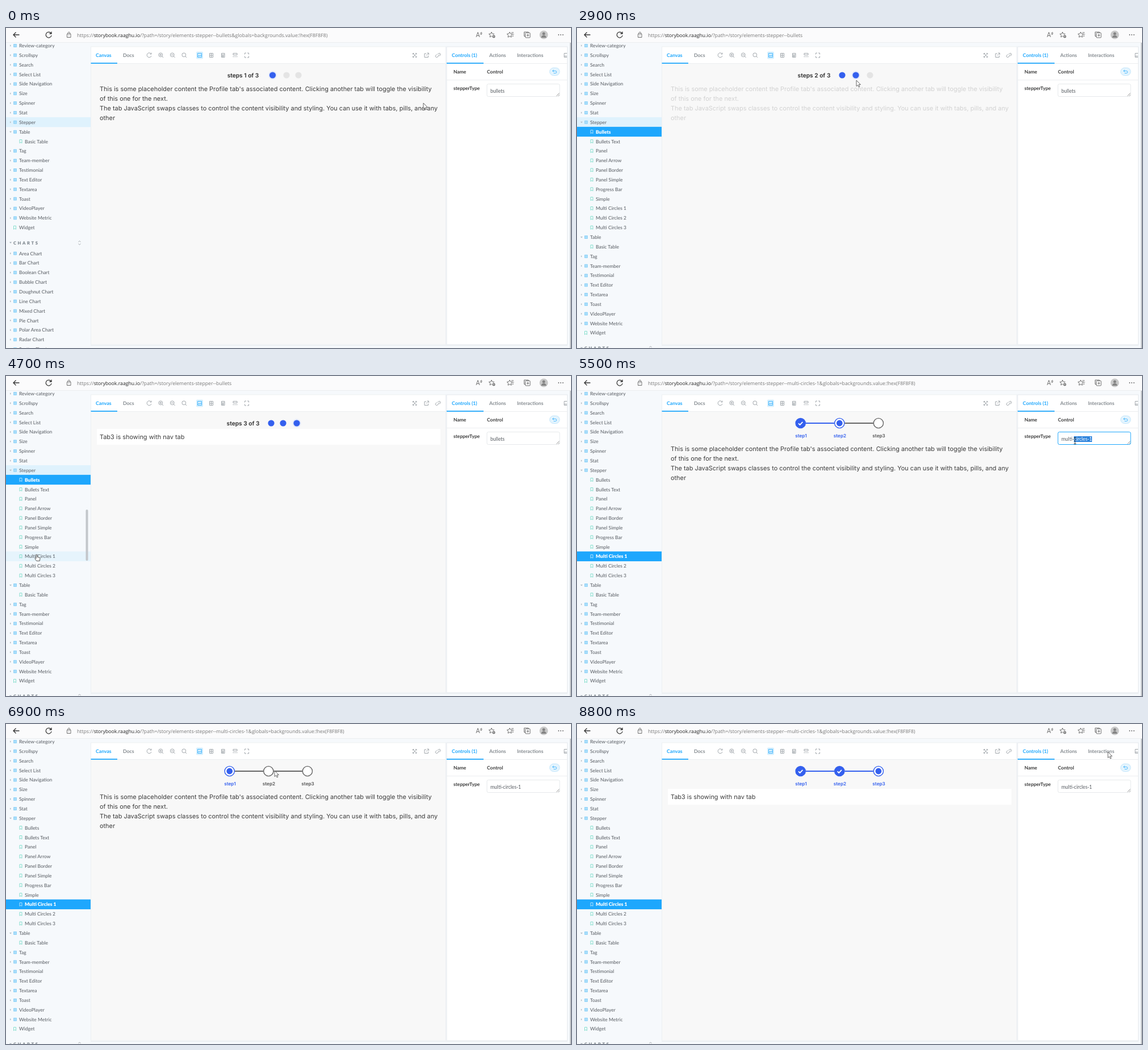
Animation, 995 px wide and 563 px high, one loop 8.9 s. Source, as an HTML page:

```html
<!DOCTYPE html>
<html lang="en">
<head>
<meta charset="utf-8">
<title>Stepper stories</title>
<style>
  html, body { margin: 0; width: 100%; height: 100%; overflow: hidden; background: #f6f9fc; }
  svg { display: block; width: 100vw; height: 100vh; }
  text { text-rendering: geometricPrecision; white-space: pre; }
  .ui { font-family: Lato, sans-serif; }
  .body { font-family: Inter, sans-serif; }
  .url { font-family: "Open Sans", sans-serif; }
  .line { fill: none; stroke: #a0a6ab; stroke-width: 1; }
  .bar { fill: none; stroke: #707070; stroke-width: 1; }
  .row text { fill: #555a60; }
  .mark { fill: none; stroke: #86dfce; stroke-width: 1; }
  .row.selected text { fill: #fff; font-weight: 900; }
  .row.selected .mark { stroke: #a9e0fd; }
  .row .back { fill: none; }
  .row.focus .back { fill: #dff2fd; }
  .row.hover .back { fill: #e6f4fc; }
  .row.selected .back { fill: #1ea7fd; }
  #field { font: 8.6px/12px Lato, sans-serif; color: #555a60; white-space: pre; }
  #field b { font-weight: 400; color: #fff; background: #2c83dc; }
</style>
</head>
<body>
<svg id="stage" viewBox="0 0 995 563" preserveAspectRatio="none">
  <rect width="995" height="563" fill="#f6f9fc"/>
  <g id="sidebar"></g>
  <rect id="scrollbar" x="140.5" width="4" rx="2" fill="#c3c7cb"/>

  <!-- canvas and controls panels -->
  <rect x="149.500" y="33" width="625" height="524" fill="#f8f8f8" stroke="#eceff2" stroke-width="1"/>
  <rect x="150" y="33.500" width="624" height="28.500" fill="#fff"/>
  <path d="M150 62.500H774" stroke="#eceef0"/>
  <rect x="776" y="33" width="212.500" height="524" fill="#fff" stroke="#e6eaee"/>
  <path d="M776 62.500H988M776 91.500H988" stroke="#eceef0"/>
  <path d="M149.500 61.800H196M776 61.800H841" stroke="#1ea7fd" stroke-width="1.700"/>
  <path d="M994 26V563" stroke="#8f9296"/>
  <path d="M149 558.500H989" stroke="#e9ecef"/>

  <g class="line">
    <path d="M255.500 45.500a4 4 0 1 0 .5 3.500M256 43.500v2.500h-2.500"/>
    <g id="lenses"></g>
    <rect x="335" y="41.500" width="12" height="13" rx="2" fill="#d5effe" stroke="none"/>
    <path d="M337.500 44.500h7v7h-7zM338 50l2-2 1.500 1.500 1.500-2 1.500 2" stroke="#4bb8fd"/>
    <path d="M358.500 44.500h6v7h-6zM358.500 48h6M361.500 44.500v7"/>
    <path d="M379.500 44.500h5.500v7h-5.500zM379.500 47h5.500M382 47v4.500M380 49.500h4"/>
    <path d="M400 44.500h7v3h-7zM399.500 50.500h2M402.500 50.500h2M405.500 50.500h2"/>
    <path d="M420.500 46.500v-2.500h2.500M425 44h2.500v2.500M427.500 49.500v2.500h-2.500M423 52h-2.500v-2.500"/>
    <path d="M716.500 46.500v-2h2M721 44.500h2v2M723 49.500v2h-2M718.500 51.500h-2v-2M717 45l5.500 6M722.500 45l-5.500 6"/>
    <path d="M740 45h-3v6.500h6.500v-3M740 48.500l4-4M741.500 44h3v3"/>
    <path d="M760.500 49.500l3-3M760 46.500l1.500-1.500a2 2 0 0 1 3 3l-1.500 1.500M761.500 49.500l-1.500 1.500a2 2 0 0 1-3-3l1.500-1.500"/>
    <path d="M988 44.500h-5v7h5M983 49.500h5"/>
  </g>
  <rect x="957.500" y="70" width="17.500" height="13.500" rx="6.700" fill="#e3f4fe" stroke="#c4e6fb"/>
  <path d="M964.500 73.500l-2 2 2 2M962.500 75.500h5a2 2 0 0 1 0 4h-3" fill="none" stroke="#4bb8fd"/>
  <rect id="box" x="847" y="98.500" width="128" height="22" rx="2.500" fill="#fff"/>
  <path d="M969.500 119.500l5-5M972.500 119.500l2-2" stroke="#888" stroke-width=".9"/>
  <foreignObject x="853" y="104.500" width="112" height="14"><div id="field"></div></foreignObject>
  <g id="labels"></g>
  <g id="stepper"></g>
  <g id="content"></g>

  <!-- address bar -->
  <rect width="995" height="25.500" fill="#fbfbfc"/>
  <path d="M0 25.500H995" stroke="#eceef0"/>
  <g class="bar">
    <path d="M23.500 12H13M17.500 7.500L13 12l4.500 4.500" stroke="#333" stroke-width="1.300"/>
    <path d="M79.500 9.500a5 5 0 1 0 .6 3.500M80 6.500v3.500h-3.500" stroke="#333" stroke-width="1.300"/>
    <path d="M107.500 10.500h6.500v6h-6.500zM109 10.500v-1.500a1.800 1.800 0 0 1 3.600 0v1.500M110.700 13v1"/>
    <path d="M828 16l3-8.500 3 8.500M829 13.500h4M835.500 8q1.500 1.500 0 3.500M837 7q2 2 0 5"/>
    <path id="star"/>
    <circle cx="859" cy="15" r="3" fill="#555" stroke="#fbfbfc"/><path d="M857.500 15h3M859 13.500v3" stroke="#fff" stroke-width=".8"/>
    <path d="M887 7l1.500 3 3.500.5-2.500 2.300.6 3.400-3.100-1.600-3 1.600.6-3.400-2.500-2.300 3.400-.5zM890 8h4M892 11h2.500M891 14h3"/>
    <path d="M915.500 8.500h6.500a1 1 0 0 1 1 1v6.500a1 1 0 0 1-1 1h-6.500a1 1 0 0 1-1-1v-6.500a1 1 0 0 1 1-1zM914 14.500h-1.500v-7.500h7.500v1.500M919 10.500v4.500M916.700 12.700h4.600"/>
  </g>
  <circle cx="947" cy="12" r="7.500" fill="#c9c9c9"/>
  <circle cx="947" cy="10" r="2.500" fill="#858585"/><path d="M942.500 17a4.500 4.200 0 0 1 9 0z" fill="#858585"/>
  <path d="M972.500 12h1.500M976.200 12h1.500M980 12h1.500" stroke="#444" stroke-width="1.500"/>
  <text class="url" x="125" y="15.500" font-size="8.700" fill="#777">https://<tspan fill="#222">storybook.raaghu.io</tspan><tspan id="path"></tspan></text>

  <g id="pointer">
    <path id="arrow" d="M0 0v10.500l2.500-2.200 1.700 3.700 1.700-.8-1.700-3.600h3.200z" fill="#fff" stroke="#555" stroke-width=".9"/>
    <path id="hand" d="M-.9 7V1a1 1 0 0 1 2 0v3.500l4 .8q1 .3 .9 1.500l-.7 4.500h-5.500l-2.800-3.800q0-1.400 1.500-.8z" fill="#fff" stroke="#444" stroke-width=".9"/>
    <path id="ibeam" d="M-2-5.500h1.500l.5.500.5-.5h1.500M0-5v10M-2 5.500h1.500l.5-.5.5.5h1.500" fill="none" stroke="#222" stroke-width=".9"/>
  </g>
</svg>
<script>
const NS = 'http://www.w3.org/2000/svg';
const LOOP = 8900, STEP = 100, PITCH = 16.85;
const BLUE = '#3460ee';
const $ = id => document.getElementById(id);

function add(parent, tag, attrs = {}, content) {
  const node = document.createElementNS(NS, tag);
  for (const key in attrs) node.setAttribute(key, attrs[key]);
  if (content !== undefined) node.textContent = content;
  return parent.appendChild(node);
}
const write = (parent, x, y, s, size, attrs) =>
  add(parent, 'text', { class: 'ui', x, y, 'font-size': size, ...attrs }, s);
const show = (node, on) => node.setAttribute('display', on ? 'inline' : 'none');

// Sidebar
const bookmark = (g, x, y) =>
  add(g, 'path', { class: 'mark', d: `M${x} ${y - 3}h4v6l-2-1.500-2 1.500z` });

function addRow(parent, label, y, kind, open) {
  const row = add(parent, 'g', { class: 'row' });
  add(row, 'rect', { class: 'back', y: y - 8.8, width: 149.5, height: 17.3 });
  if (kind === 'story') bookmark(row, 24, y);
  else if (kind === 'single') bookmark(row, 13.5, y);
  else {
    add(row, 'rect', { x: 13, y: y - 3, width: 6, height: 6, rx: 1, fill: '#93d4f8' });
    add(row, 'path', { d: `M13.500 ${y}h5M16 ${y - 2.5}v5`, stroke: '#c8eafc', 'stroke-width': .7 });
    row.caret = add(row, 'path', { fill: '#b3bcc3' });
    setCaret(row, y, open);
  }
  write(row, kind === 'story' ? 33 : 23, y + 3, label, 8.5);
  return row;
}
function setCaret(row, y, open) {
  row.caret.setAttribute('d', open ? `M6 ${y - 1}h4l-2 2.500z` : `M7 ${y - 1.8}v3.600l2-1.800z`);
}

const above = ['Review-category', 'Scrollspy', 'Search', 'Select List', 'Side Navigation',
  'Size', 'Spinner', 'Stat', 'Stepper'];
const stories = ['Bullets', 'Bullets Text', 'Panel', 'Panel Arrow', 'Panel Border', 'Panel Simple',
  'Progress Bar', 'Simple', 'Multi Circles 1', 'Multi Circles 2', 'Multi Circles 3'];
const below = ['Table', 'Basic Table', 'Tag', 'Team-member', 'Testimonial', 'Text Editor',
  'Textarea', 'Toast', 'VideoPlayer', 'Website Metric', 'Widget'];
const charts = ['Area', 'Bar', 'Boolean', 'Bubble', 'Doughnut', 'Line', 'Mixed', 'Pie',
  'Polar Area', 'Radar', 'Scatter'];
const rowY = i => 31 + i * PITCH;
const kinds = { 'Basic Table': 'story', Widget: 'single' };

const topRows = above.map((s, i) => addRow($('sidebar'), s, rowY(i)));
const stepperRow = topRows[8];
const storyGroup = add($('sidebar'), 'g');
const storyRows = stories.map((s, i) => addRow(storyGroup, s, rowY(9 + i), 'story'));
const lower = add($('sidebar'), 'g');
below.forEach((s, i) => addRow(lower, s, rowY(9 + i), kinds[s], s === 'Table'));
add(lower, 'path', { d: 'M6 376.500h4l-2 2.500z', fill: '#a3adb5' });
write(lower, 13, 381, 'CHARTS', 7.6, { fill: '#7c858d', 'font-weight': 900, 'letter-spacing': 2.6 });
add(lower, 'path', { class: 'line', d: 'M127.500 376.500l2-2 2 2M127.500 379.500l2 2 2-2' });
charts.forEach((s, i) => addRow(lower, s + ' Chart', 396.6 + i * PITCH));

// Panel labels and small icons
[[158, 48, 'Canvas', 1], [206, 48, 'Docs'], [785, 48, 'Controls (1)', 1], [851, 48, 'Actions'],
  [900, 48, 'Interactions']].forEach(([x, y, s, on]) =>
  write($('labels'), x, y + 3.2, s, 8.7, { fill: on ? '#1ea7fd' : '#858b90', 'font-weight': 700 }));
[[788, 77, 'Name'], [847, 77, 'Control'], [788, 106, 'stepperType']].forEach(([x, y, s]) =>
  write($('labels'), x, y + 3, s, 8.5, { fill: '#3c3c3c', 'font-weight': 700 }));
[273, 293.5, 314].forEach((x, i) => {
  const sign = ['M-2 0h4M0-2v4', 'M-2 0h4', ''][i];
  const lens = add($('lenses'), 'g', { transform: `translate(${x - .7} 47.300)` });
  add(lens, 'circle', { r: 3.4 });
  add(lens, 'path', { d: 'M2.500 2.500l2.300 2.300' + sign });
});
const star = Array.from({ length: 10 }, (_, i) => {
  const a = i * Math.PI / 5, r = i % 2 ? 2.3 : 5;
  return `${855 + r * Math.sin(a)} ${12 - r * Math.cos(a)}`;
});
$('star').setAttribute('d', `M${star.join('L')}z`);

// Story canvas
const paragraphs = [
  "This is some placeholder content the Profile tab's associated content. Clicking another tab will toggle the visibility",
  'of this one for the next.',
  'The tab JavaScript swaps classes to control the content visibility and styling. You can use it with tabs, pills, and any',
  'other'];
const bulletX = [[469.5, 494, 515], [467, 491, 516], [467, 488, 512]];

function drawBullets(g, step) {
  write(g, 417.5, 87, `steps ${step} of 3`, 10.2,
    { class: 'body', 'text-anchor': 'middle', 'font-weight': 600, fill: '#2b2b2b' });
  bulletX[step - 1].forEach((cx, i) => {
    if (i === step - 1) add(g, 'circle', { cx, cy: 83, r: 7.5, fill: '#e3e9fb' });
    add(g, 'circle', { cx, cy: 83, r: 5.6, fill: i < step ? BLUE : '#e4e4e4' });
  });
}

function drawCircles(g, step) {
  const grey = '#666', at = i => 393.7 + i * 68.6;
  for (let i = 0; i < 2; i++)
    add(g, 'path', { d: `M${at(i) + 9} 83H${at(i + 1) - 9}`, stroke: i + 1 < step ? BLUE : grey, 'stroke-width': 2 });
  for (let i = 0; i < 3; i++) {
    const cx = at(i), done = i + 1 < step, active = i + 1 === step, color = done || active ? BLUE : grey;
    add(g, 'circle', { cx, cy: 83, r: 8.6, fill: done ? BLUE : '#fff', stroke: color, 'stroke-width': 1.4 });
    if (active) add(g, 'circle', { cx, cy: 83, r: 5.4, fill: BLUE });
    if (done) add(g, 'path', { d: `M${cx - 3.7} 83.300l2.600 2.600 4.800-5`, fill: 'none', stroke: '#fff', 'stroke-width': 1.8 });
    write(g, cx + .7, 108.3, `step${i + 1}`, 8.2,
      { class: 'body', 'text-anchor': 'middle', 'font-weight': 600, fill: done || active ? BLUE : '#555' });
  }
}

let drawn = '';
function drawStory(multi, step) {
  const key = `${multi} ${step}`;
  if (key === drawn) return;
  drawn = key;
  $('stepper').replaceChildren();
  $('content').replaceChildren();
  (multi ? drawCircles : drawBullets)($('stepper'), step);
  const y = multi ? 128 : 107;
  const lines = step === 3 ? ['Tab3 is showing with nav tab'] : paragraphs;
  if (step === 3) add($('content'), 'rect', { x: 160, y: y - 14, width: 605, height: 28, fill: '#fff' });
  lines.forEach((s, i) => write($('content'), 165, y + 3.8 + i * 17.2, s, 10.92, { class: 'body', fill: '#3c3c3c' }));
}

// Timeline: [time, x, y] of the pointer and [time, multi, step] of the story
const route = [[0, 735, 132], [800, 140, 175], [1000, 73, 170], [1200, 73, 170], [1300, 73, 177],
  [1700, 73, 177], [2500, 492, 92], [3500, 492, 92], [3800, 511, 88], [3900, 511, 88],
  [4400, 54, 317], [4500, 54, 319], [4600, 54, 319], [4700, 54, 314], [4900, 54, 314],
  [5400, 908, 112], [5500, 877, 114], [5700, 853, 113], [6200, 392, 83], [6600, 473, 82],
  [6900, 473, 82], [7000, 465, 82], [7100, 465, 82], [7500, 523, 82], [7700, 528, 83],
  [7900, 528, 83], [8700, 905, 63], [8800, 935, 49], [LOOP, 935, 49]];
const clicks = [[0, false, 1], [2900, false, 2], [3900, false, 3], [4900, true, 2],
  [6200, true, 1], [7100, true, 2], [7900, true, 3]];
const EXPAND = 1300, OPEN_MULTI = 4900, SELECT = 5400, BLUR = 6200;

function pointerAt(t) {
  const i = route.findIndex(p => p[0] > t), [t0, x0, y0] = route[i - 1], [t1, x1, y1] = route[i];
  const k = (t - t0) / (t1 - t0);
  return [x0 + (x1 - x0) * k, y0 + (y1 - y0) * k];
}

function drawField(t, multi, x) {
  const value = multi ? 'multi-circles-1' : 'bullets';
  const focused = t >= SELECT && t < BLUR;
  const from = !focused ? value.length : Math.max(0, Math.min(value.length, Math.floor((x - 853) / 3.6)));
  const start = focused && t > 5700 ? 0 : from;
  const marked = document.createElement('b');
  marked.textContent = value.slice(start);
  $('field').replaceChildren(value.slice(0, start), marked);
  $('box').setAttribute('stroke', focused ? '#1ea7fd' : '#e6e9eb');
}

function render(t) {
  const [x, y] = pointerAt(t);
  const [since, multi, step] = clicks.filter(c => c[0] <= t).pop();
  const open = t >= EXPAND, inSidebar = x < 149;

  show(storyGroup, open);
  lower.setAttribute('transform', `translate(0 ${open ? 11 * PITCH : 0})`);
  setCaret(stepperRow, rowY(8), open);
  stepperRow.classList.toggle('focus', t < OPEN_MULTI);
  storyRows.forEach((row, i) => {
    row.classList.toggle('selected', i === (multi ? 8 : 0));
    row.classList.toggle('hover', inSidebar && Math.abs(y - rowY(9 + i)) < PITCH / 2);
  });
  show($('scrollbar'), inSidebar);
  $('scrollbar').setAttribute('y', open ? 235 : 248);
  $('scrollbar').setAttribute('height', open ? 90 : 96);

  $('path').textContent = '/?path=/story/elements-stepper--' + (multi ? 'multi-circles-1' : 'bullets') +
    (multi || !open ? '&globals=backgrounds.value:!hex(F8F8F8)' : '');

  drawStory(multi, step);
  const fades = since > 0 && since !== OPEN_MULTI;
  $('content').setAttribute('opacity', fades ? Math.min(1, .2 + (t - since) / 250) : 1);
  drawField(t, multi, x);

  const inField = x > 847 && x < 975 && y > 98 && y < 121;
  show($('hand'), inSidebar);
  show($('ibeam'), inField);
  show($('arrow'), !inSidebar && !inField);
  $('pointer').setAttribute('transform', `translate(${x} ${y})`);
}

const begin = performance.now();
function tick() {
  const t = (performance.now() - begin) % LOOP;
  render(Math.floor(t / STEP) * STEP);
  requestAnimationFrame(tick);
}
tick();
</script>
</body>
</html>
```
